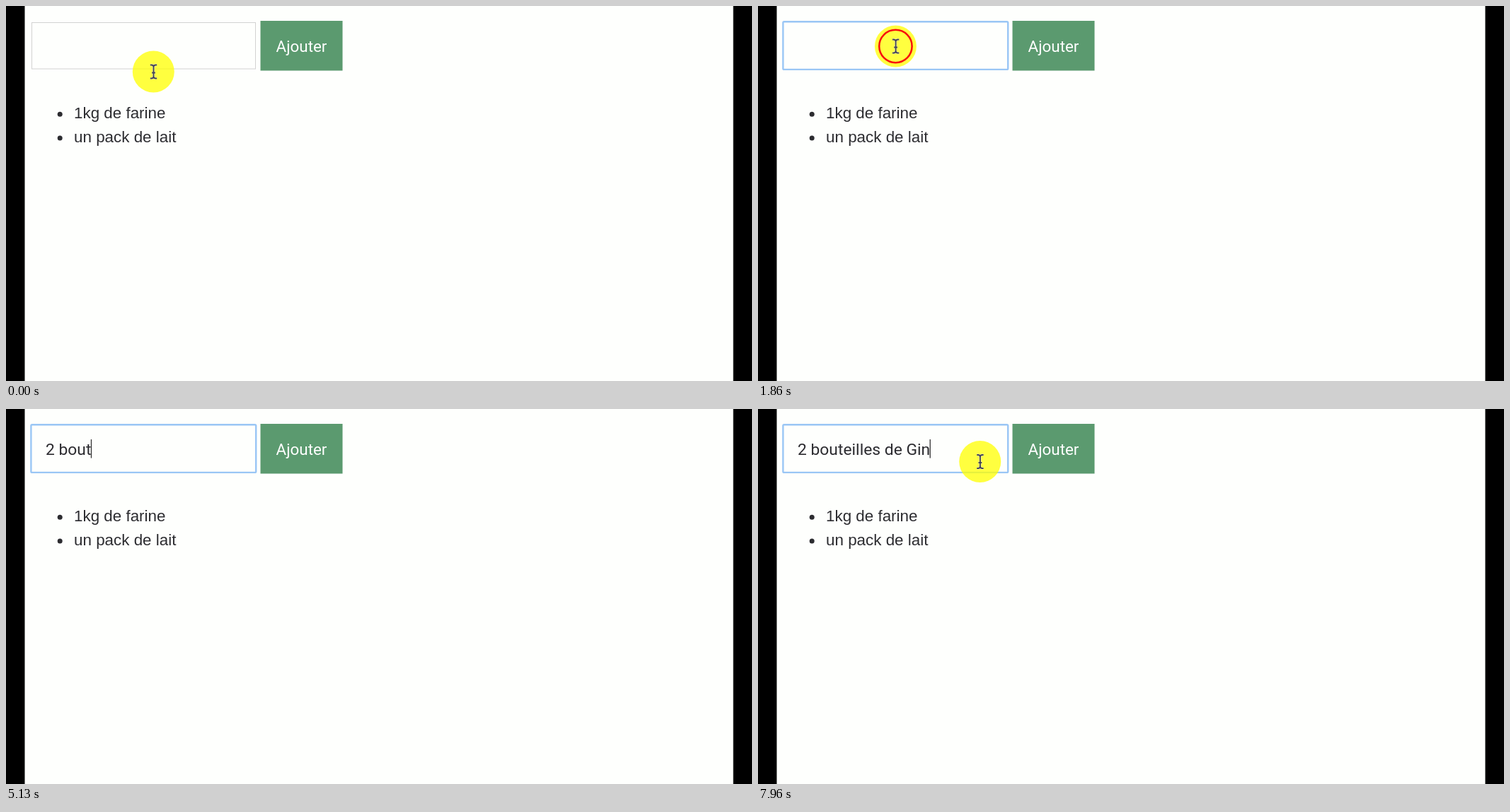
Recreate the animation shown at these times as an HTML page. Size 1054 by 531 pixels, loop 8 s.

```html
<!DOCTYPE html>
<html lang="fr">
<head>
<meta charset="utf-8">
<title>Liste de courses</title>
<style>
  html, body { margin: 0; width: 100%; height: 100%; overflow: hidden; background: #000; }
  svg { display: block; }
  text { white-space: pre; fill: #2c2c30; }
  .list { font: 22.4px "Liberation Sans", Arial, sans-serif; }
  .ui { font: 22.85px Roboto, sans-serif; }
  #ibeam path { fill: none; stroke: #45455a; stroke-width: 1.9; }
  #ibeam .halo { stroke: #fff; stroke-width: 3.6; opacity: .4; }
</style>
</head>
<body>
<svg width="1054" height="531" viewBox="0 0 1054 531">
  <rect x="26.5" width="1001" height="531" fill="#fefffd"/>
  <rect id="idle" x="36.5" y="23.5" width="316" height="65.5" fill="none" stroke="#d2d2d2"/>
  <rect id="focus" x="35.4" y="22.3" width="317.8" height="67.6" rx="1.5" fill="none" stroke="#9ac6f5" stroke-width="2.4"/>
  <rect x="359.5" y="21" width="116" height="70.5" fill="#5b9a6f"/>
  <text class="ui" x="381.6" y="64.5" style="font-size:22.4px;fill:#fff">Ajouter</text>
  <text id="entry" class="ui" x="56" y="64.5"></text>
  <rect id="caret" y="43" width="1.3" height="26.5" fill="#333"/>
  <g class="list">
    <circle cx="76.2" cy="153.3" r="3.5" fill="#2c2c30"/>
    <text x="96" y="159.2">1kg de farine</text>
    <circle cx="76.2" cy="187" r="3.5" fill="#2c2c30"/>
    <text x="96" y="192.8">un pack de lait</text>
  </g>
  <g id="pointer">
    <circle r="29.5" fill="#ff0" fill-opacity=".75"/>
    <circle id="ring" fill="none" stroke="#f80c0c" stroke-width="2.5"/>
    <g id="ibeam"></g>
  </g>
</svg>
<script>
const LOOP = 8000;
const $ = id => document.getElementById(id);
const [idle, focusBox, entry, caret, pointer, ring] =
  ['idle', 'focus', 'entry', 'caret', 'pointer', 'ring'].map($);

const beam = 'M-4.5-9.5h1.8q2.9 0 2.9 3v13q0 3-2.9 3h-1.8M4.9-9.5h-1.8q-2.9 0-2.9 3M.2 6.5q0 3 2.9 3h1.8M-2.2 1.5h4.8';
$('ibeam').innerHTML = `<path class="halo" d="${beam}"/><path d="${beam}"/>`;

const phrase = '2 bouteilles de Gin';
const keyTimes = [4000, 4560, 4760, 4960, 5030, 5130, 5330, 5530, 5700, 5800,
                  5900, 6000, 6100, 6300, 6400, 6530, 6900, 7000, 7130];
const blinkTimes = [1100, 1670, 2230, 2800, 3360, 3930, 4500, 5060, 5630, 6200, 6800, 7360, 7900];

// A blink toggles the caret; a key press always shows it.
const caretEvents = [
  ...keyTimes.map(time => ({ time, key: true })),
  ...blinkTimes.map(time => ({ time, key: false })),
].sort((a, b) => a.time - b.time);

const caretOn = t => caretEvents.reduce(
  (on, e) => e.time > t ? on : e.key || !on, false);

function pointerAt(t) {
  if (t < 30) return [208.3, 93];
  if (t < 100) return [199, 67];
  if (t < 430) return [196, 57];
  if (t < 3930) return [194.4, 57];
  if (t < 7730) return null;
  const p = Math.min(1, Math.floor((t - 7730) / 38) / 6);
  return [194.4 + 119.3 * p ** 1.4, 57 + 17.5 * p ** 1.8];
}

const show = (el, on) => el.setAttribute('visibility', on ? 'visible' : 'hidden');

function draw(t) {
  const focused = t >= 1100;
  show(idle, !focused);
  show(focusBox, focused);

  entry.textContent = phrase.slice(0, keyTimes.filter(k => k <= t).length);
  const width = entry.textContent ? entry.getComputedTextLength() : 0;
  caret.setAttribute('x', 55.4 + width);
  show(caret, caretOn(t));

  const pos = pointerAt(t);
  show(pointer, pos);
  if (pos) pointer.setAttribute('transform', `translate(${pos})`);
  show(ring, t >= 1100 && t < 2360);
  ring.setAttribute('r', Math.max(0, 10.1 + (t - 1100) * .0172));
}

const start = performance.now();
function tick() {
  draw((performance.now() - start) % LOOP);
  requestAnimationFrame(tick);
}
tick();
</script>
</body>
</html>
```
